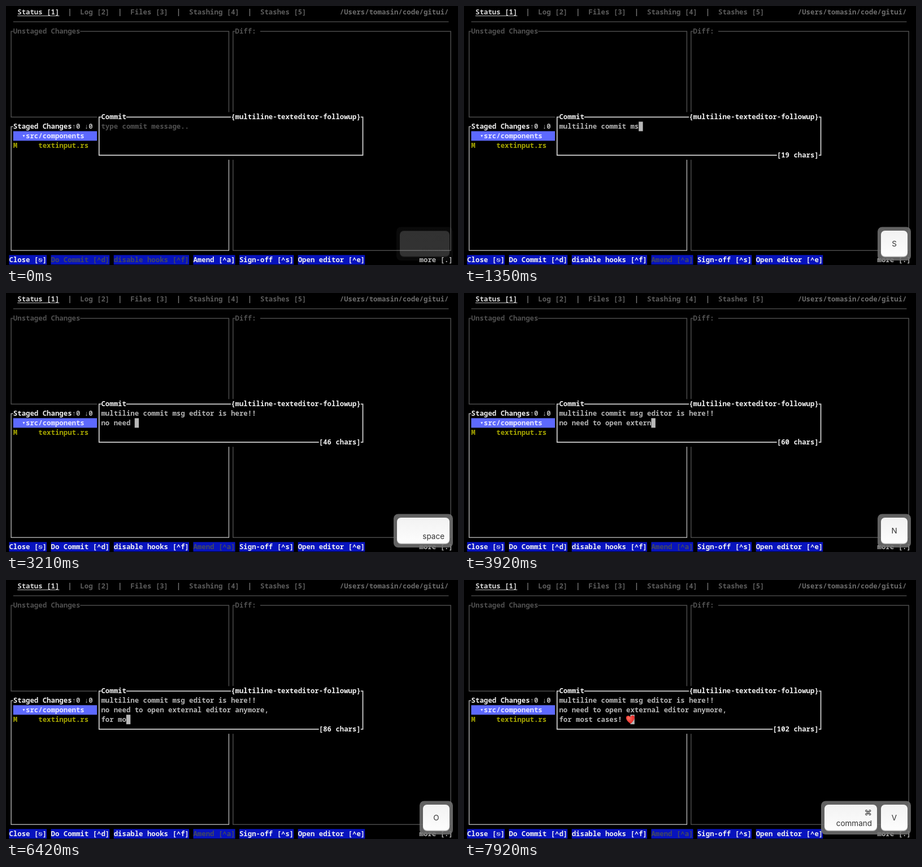
These frames come from a looping animation (800 by 460 pixels, 7.99 s). An HTML page with a canvas:

```html
<!DOCTYPE html>
<html>
<head>
<meta charset="utf-8">
<style>
  html, body { margin: 0; width: 100%; height: 100%; overflow: hidden; background: #000; }
  canvas { display: block; }
</style>
</head>
<body>
<canvas id="stage" width="800" height="460"></canvas>
<script>
const ctx = document.getElementById('stage').getContext('2d');
const LOOP = 7990, PASTE = 7920;
const CW = 7.41, RH = 16.92;
const MONO = '"Noto Sans Mono", "DejaVu Sans Mono", monospace';
const SANS = 'Inter, "DejaVu Sans", sans-serif';
const BLUE = '#0713bd', DIM = '#505050', WHITE = '#f0f0f0', SOFT = '#b4b4b4';

const MESSAGE = 'multiline commit msg editor is here!!\n' +
  'no need to open external editor anymore, \nfor most cases! ';

// Typing bursts: first key, last key (ms), number of characters
const BURSTS = [
  [210, 710, 10], [990, 1350, 9], [1420, 1490, 2], [1710, 2280, 14],
  [2420, 2420, 1], [2500, 2500, 1], [2780, 2780, 1], [2850, 3570, 16],
  [3640, 3920, 6], [3990, 4070, 3], [4210, 4780, 14], [5070, 5070, 1],
  [5710, 5710, 1], [5850, 5850, 1], [6070, 6420, 6], [6490, 7000, 8],
  [7140, 7140, 1], [7490, 7490, 1]
];

const colX = c => 5.4 + c * CW;
const rowY = r => 2.4 + r * RH;

function typed(t) {
  let n = 0;
  for (const [from, to, count] of BURSTS) {
    const p = Math.min(1, (t + 8 - from) / Math.max(1, to - from));
    if (p >= 0) n += 1 + Math.floor((count - 1) * p);
  }
  return n;
}

function cells(col, row, width, height, color) {
  ctx.fillStyle = color;
  ctx.fillRect(colX(col), rowY(row), width * CW, height * RH);
}

function text(s, col, row, color, weight = 600, back) {
  if (back) cells(col, row, s.length, 1, back);
  ctx.font = `${weight} 12.35px ${MONO}`;
  ctx.textAlign = 'left';
  ctx.fillStyle = color;
  [...s].forEach((ch, i) => ctx.fillText(ch, colX(col + i), rowY(row) + 12.6));
}

function line(x0, y0, x1, y1, color, width = 1.4) {
  ctx.strokeStyle = color;
  ctx.lineWidth = width;
  ctx.beginPath();
  ctx.moveTo(x0, y0);
  ctx.lineTo(x1, y1);
  ctx.stroke();
}

function box(c0, r0, c1, r1, color, width = 1.4) {
  const x = colX(c0 + .5), y = rowY(r0) + 8.8;
  ctx.strokeStyle = color;
  ctx.lineWidth = width;
  ctx.strokeRect(x, y, (c1 - c0) * CW, (r1 - r0) * RH);
}

function panels() {
  text('Status [1]', 2, 0, '#d8d8d8', 700);
  line(colX(2), 17.5, colX(12), 17.5, '#c0c0c0', 1.2);
  [['Log [2]', 17], ['Files [3]', 29], ['Stashing [4]', 43], ['Stashes [5]', 60]]
    .forEach(([s, c]) => {
      text('|', c - 3, 0, '#777');
      text(s, c, 0, '#5c5c5c');
    });
  text('/Users/tomasin/code/gitui/', 79, 0, '#6c6c6c');
  line(colX(1), 28, colX(105), 28, '#444');

  box(0, 2, 52, 11, DIM);
  text('Unstaged Changes', 1, 2, DIM, 600, '#000');
  box(53, 2, 105, 25, DIM);
  text('Diff: ', 54, 2, DIM, 600, '#000');
  box(0, 12, 52, 25, SOFT);
  text('Staged Changes', 1, 12, WHITE, 700, '#000');
  text('↑0 ↓0 ', 15, 12, SOFT, 600, '#000');
  cells(1, 13, 20, 1, '#5d69ff');
  text('▾src/components', 3, 13, '#e8e8ff');
  text('M', 1, 14, '#a5a500');
  text('textinput.rs', 7, 14, '#a5a500');
}

function commands(empty) {
  const off = '#454a5c';
  const list = [
    ['Close [⎋]', 0, true], ['Do Commit [^d]', 10, !empty],
    ['disable hooks [^f]', 25, !empty], ['Amend [^a]', 44, empty],
    ['Sign-off [^s]', 55, true], ['Open editor [^e]', 69, true]
  ];
  for (const [s, c, on] of list) text(s, c, 26, on ? WHITE : off, on ? 700 : 600, BLUE);
  text('more [.]', 98, 26, SOFT);
}

function heart(x, y) {
  ctx.save();
  ctx.translate(x, y);
  ctx.rotate(-.06);
  const g = ctx.createRadialGradient(-3, -3, 1, 0, 0, 10);
  g.addColorStop(0, '#ff6a58');
  g.addColorStop(1, '#d8141a');
  ctx.fillStyle = g;
  ctx.beginPath();
  ctx.moveTo(0, 7.5);
  ctx.bezierCurveTo(-10, 0, -8.5, -7, -4, -7);
  ctx.bezierCurveTo(-1.5, -7, -.3, -5.3, 0, -4);
  ctx.bezierCurveTo(.3, -5.3, 1.5, -7, 4, -7);
  ctx.bezierCurveTo(8.5, -7, 10, 0, 0, 7.5);
  ctx.fill();
  ctx.restore();
}

function popup(n, pasted) {
  cells(21, 11, 64, 5, '#000');
  box(21, 11, 84, 15, '#d6d6d6', 1.7);
  text('Commit', 22, 11, WHITE, 700, '#000');
  text('{multiline-texteditor-followup}', 53, 11, WHITE, 700, '#000');
  if (!n) return text('type commit message..', 22, 12, DIM);

  const lines = MESSAGE.slice(0, n).split('\n');
  lines.forEach((s, i) => text(s, 22, 12 + i, SOFT));
  const row = 11 + lines.length, end = 22 + lines.at(-1).length;
  cells(end + (pasted ? 1 : 0), row, 1, 1, '#b8b8b8');
  if (pasted) heart(colX(end) + 7.6, rowY(row) + 8.5);
  const count = `[${n + (pasted ? 6 : 0)} chars]`;
  text(count, 84 - count.length, 15, WHITE, 700, '#000');
}

function rounded(x, y, w, h, r, fill) {
  ctx.fillStyle = fill;
  ctx.beginPath();
  ctx.roundRect(x, y, w, h, r);
  ctx.fill();
}

const WIDE = { shift: '⇧', command: '⌘', return: '↩', delete: '⌫', space: '' };

function keycaps(keys, alpha = 1) {
  const widths = keys.map(k => k in WIDE ? (k === 'delete' ? 88 : 93) : 47);
  const total = widths.reduce((a, b) => a + b + 7, 5);
  let x = 791 - total;
  ctx.globalAlpha = alpha;
  rounded(x, 392.5, total, 59.5, 8, 'rgba(112,112,112,.88)');
  x += 6;
  keys.forEach((key, i) => {
    const w = widths[i];
    rounded(x, 400, w, 46, 7, '#b5b5b5');
    const face = ctx.createLinearGradient(0, 399, 0, 444);
    face.addColorStop(0, '#f2f2f2');
    face.addColorStop(1, '#fdfdfd');
    rounded(x, 399, w, 45.5, 7, face);
    ctx.fillStyle = '#333';
    ctx.font = `400 13.5px ${SANS}`;
    if (key in WIDE) {
      ctx.textAlign = 'right';
      ctx.fillText(key, x + w - 9, 437);
      ctx.fillText(WIDE[key], x + w - 9, 418);
    } else {
      ctx.textAlign = 'center';
      ctx.fillText(key, x + w / 2, 427);
    }
    x += w + 7;
  });
  ctx.globalAlpha = 1;
}

function keysAt(t) {
  if (t >= PASTE) return ['command', 'V'];
  if (t >= 7850) return ['command'];
  let c = MESSAGE[typed(t) - 1];
  // Punctuation reaches the key display a little later
  if (c === '!' || c === ',') c = MESSAGE[typed(t - 140) - 1];
  if (c === '!') return ['shift', '1'];
  if (c === ' ') return ['space'];
  if (c === '\n') return ['return'];
  return [c.toUpperCase()];
}

function draw(t) {
  const n = typed(t);
  ctx.fillStyle = '#000';
  ctx.fillRect(0, 0, 800, 460);
  panels();
  popup(n, t >= PASTE);
  commands(!n);
  if (n) keycaps(keysAt(t));
  else if (t < 70) keycaps(['delete'], .1);
}

const start = performance.now();
function tick() {
  draw((performance.now() - start) % LOOP);
  requestAnimationFrame(tick);
}
tick();
</script>
</body>
</html>
```
